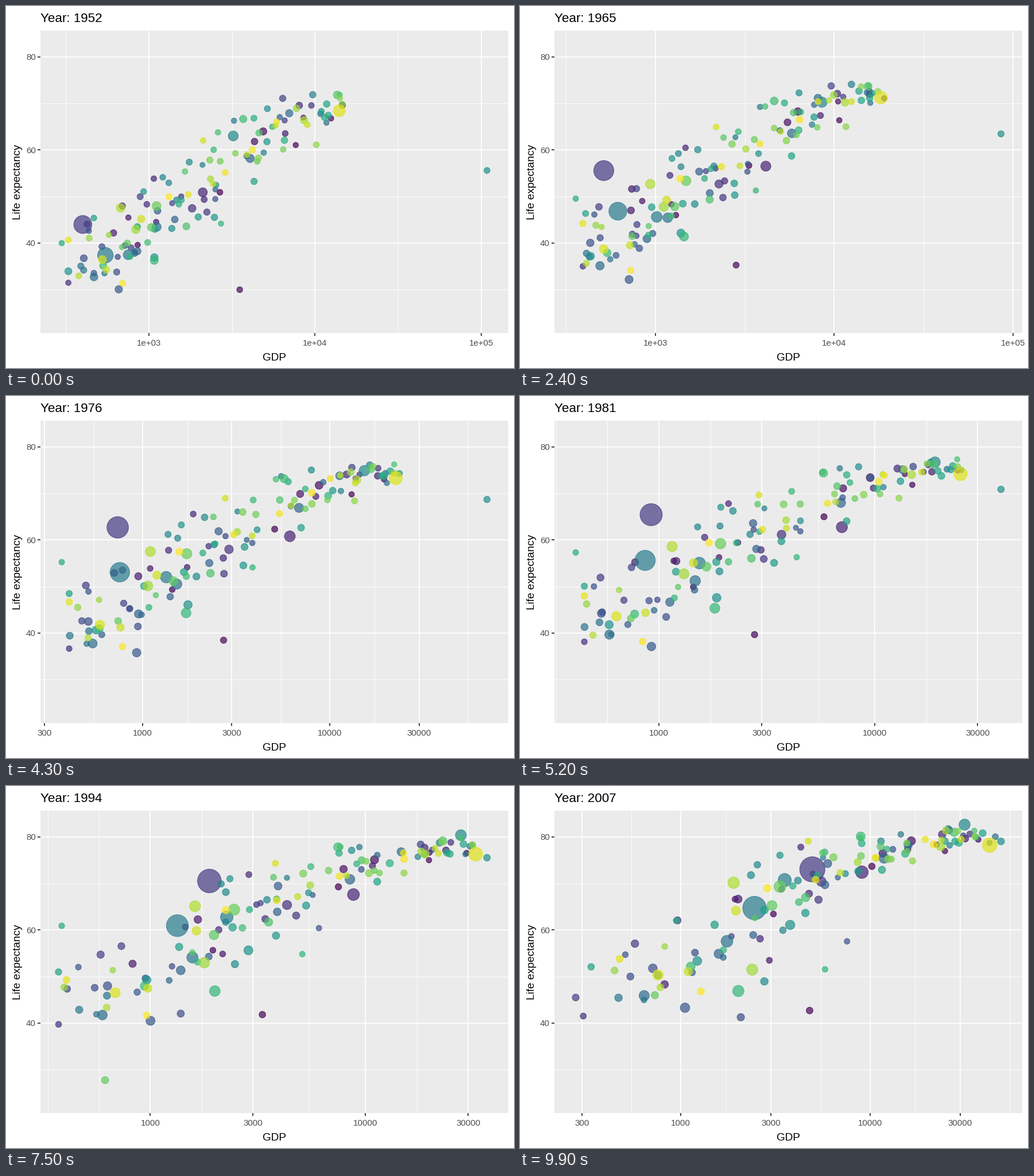
A matplotlib script for the animation above (10 s loop, 885 by 632 pixels).

```python
import numpy as np
import matplotlib.pyplot as plt
from matplotlib.animation import FuncAnimation

W, H, DPI = 885, 632, 120
FRAMES, INTERVAL = 100, 100
LEFT, RIGHT, TOP, BOTTOM = 60, 875, 43.4, 571.4
N = 142
YEARS = np.arange(1952, 2008, 5)
F = np.linspace(0, 1, len(YEARS))

# Colour rank, population range (millions), then GDP and life expectancy
# in 1952, 1980 and 2007.
LARGE = [
    (24, (556, 1319), (400, 880, 4959), (44, 65, 73)),
    (58, (372, 1110), (547, 840, 2452), (37.4, 55.2, 64.7)),
    (134, (158, 301), (13990, 24500, 42952), (68.4, 74, 78.2)),
    (66, (86, 127), (3217, 18400, 31656), (63, 76.4, 82.6)),
    (59, (82, 223), (750, 1500, 3541), (37.5, 54.5, 70.7)),
    (14, (57, 190), (2109, 6900, 9066), (50.9, 62.4, 72.4)),
    (94, (33, 135), (1077, 1800, 2014), (36.3, 45.2, 46.9)),
    (3, (4, 12), (3520, 2750, 4797), (30, 39.5, 42.7)),
]
# Bubbles at the ends of the x axis: log GDP turns at these years.
RICHEST, POOREST, FALLING, CRASHING = 71, 87, 27, 107
TURNS = {
    RICHEST: ([1952, 1957, 1967, 1972, 1982, 1987, 2007],
              [5.035, 5.055, 4.908, 5.039, 4.528, 4.5, 4.693]),
    POOREST: ([1952, 1962, 1977, 1982, 1992, 2007],
              [2.475, 2.55, 2.57, 2.627, 2.54, 2.975]),
    FALLING: ([1952, 1977, 1992, 2002, 2007],
              [2.893, 2.9, 2.66, 2.382, 2.444]),
}


def curve(keys):
    """Parabola through the 1952, 1980 and 2007 values."""
    return np.polyval(np.polyfit([0, 28, 55], keys, 2), YEARS - 1952)


def wealth(u):
    """Log GDP for wealth rank u, widening over the years."""
    return 2.6 + .08 * F + (1.55 + .4 * F) * u ** (1.2 - .28 * F)


def health(g):
    """Life expectancy rises with log GDP along an S curve."""
    return 32 + 6 * F + (42 + 2 * F) / (1 + np.exp((.4 * F - 2.6) * (g - 3.35 + .15 * F)))


def build():
    rng = np.random.default_rng(12)
    u = rng.permutation(np.linspace(0, 1, N))[:, None]
    u[CRASHING] = .08

    # Every bubble follows the trend with its own offsets.
    start, end = rng.normal(0, .1, (2, N, 1))
    gdp = wealth(u) + (1 - F) * start + F * end * (1.3 - u)
    gdp += rng.normal(0, .035, gdp.shape)

    first = np.clip(rng.lognormal(np.log(4.5), 1.1, (N, 1)), .06, 60)
    pop = first * (1 + F * (2.2 - 1.9 * u ** 2))

    for i, (years, keys) in TURNS.items():
        gdp[i] = np.interp(YEARS, years, keys)
    for i, people, g, _ in LARGE:
        gdp[i] = curve(np.log10(g))
        pop[i] = np.interp(F, [0, 1], people)
    gdp[CRASHING] = 2.87 - .12 * np.exp(-((YEARS - 1997) / 6) ** 2)

    ends = gdp[list(TURNS)]
    inner = np.setdiff1d(np.arange(N), list(TURNS))
    gdp[inner] = np.clip(gdp[inner], ends.min(0) + .04, ends.max(0) - .03)

    z = np.clip(rng.normal(0, 1, (N, 1)), -2.2, 1.5)
    spread = np.interp(gdp, [2.5, 3.3, 3.8, 4.2], [4, 6.5, 4.5, 1.4])
    life = health(gdp) + z * spread + rng.normal(0, .4, gdp.shape)
    life -= 13 * (rng.random((N, 1)) < .1) * (u < .75) * np.clip((YEARS - 1987) / 15, 0, 1)

    life[RICHEST] = curve((55.6, 70.5, 79))
    life[POOREST] = curve((40, 57, 62))
    life[FALLING] = curve((39, 47, 45.5))
    for i, _, _, keys in LARGE:
        life[i] = curve(keys)
    life[CRASHING] = 40 + 6 * F
    life[CRASHING, YEARS == 1992] = 23.6
    life[CRASHING, YEARS == 1997] = 36.1

    size = 2 + 10 * np.sqrt(np.clip(pop / 1319, 0, 1))
    return gdp, life, size, ends


GDP, LIFE, SIZE, ENDS = build()

plt.rcParams["font.family"] = "Liberation Sans"
fig = plt.figure(figsize=(W / DPI, H / DPI), dpi=DPI, facecolor="white")
ax = fig.add_axes([LEFT / W, 1 - BOTTOM / H, (RIGHT - LEFT) / W, (BOTTOM - TOP) / H],
                  facecolor="#EBEBEB")
ax.set_axisbelow(True)
for spine in ax.spines.values():
    spine.set_visible(False)
ax.tick_params(which="major", length=2.75, width=1.07, color="#333333",
               labelcolor="#4D4D4D", labelsize=9)
ax.tick_params(which="minor", length=0)
ax.tick_params(axis="x", pad=3.6)
ax.tick_params(axis="y", pad=2.2)
ax.grid(which="major", color="white", linewidth=1.07)
ax.grid(which="minor", color="white", linewidth=.53)
ax.set_yticks([40, 60, 80])
ax.set_yticks([30, 50, 70], minor=True)
ax.set_ylim(20.649, 85.553)


def label(x, y, text, size, **kw):
    return fig.text(x / W, 1 - y / H, text, fontsize=size, color="black",
                    va="baseline", **kw)


title = label(60, 28, "", 13.4)
label((LEFT + RIGHT) / 2, 619, "GDP", 11.4, ha="center")
label(25, (TOP + BOTTOM) / 2, "Life expectancy", 11.4, ha="center",
      rotation=90, rotation_mode="anchor")

colors = plt.get_cmap("viridis")(np.linspace(0, 1, N))
colors[:, 3] = .7
dots = ax.scatter(GDP[:, 0], LIFE[:, 0], c=colors, edgecolors=colors,
                  linewidths=.71, zorder=3)


def set_axis(low, high):
    pad = .05 * (high - low)
    low, high = low - pad, high + pad
    decades = high >= 5
    if decades:
        breaks = np.arange(2, 7.)
    else:
        breaks = np.log10([300, 1000, 3000, 10000, 30000])
    major = breaks[(breaks >= low) & (breaks <= high)]
    step = major[1] - major[0]
    full = np.r_[major[0] - step, major, major[-1] + step]
    minor = np.r_[full[0], (full[1:] + full[:-1]) / 2, full[-1]]
    minor = minor[(minor > low) & (minor < high)]
    names = [f"1e+{m:02.0f}" if decades else f"{10 ** m:.0f}" for m in major]
    ax.set_xticks(major, names)
    ax.set_xticks(minor, minor=True)
    ax.set_xlim(low, high)


def update(frame):
    t = 55 * frame / (FRAMES - 1)
    k = min(int(t / 5), len(YEARS) - 2)
    w = t / 5 - k

    def at(a):
        return (1 - w) * a[:, k] + w * a[:, k + 1]

    ends = at(ENDS)
    set_axis(ends.min(), ends.max())
    dots.set_offsets(np.c_[at(GDP), at(LIFE)])
    dots.set_sizes((.75 * (at(SIZE) * 2.845 + .945)) ** 2)
    title.set_text(f"Year: {1952 + t:.0f}")
    return dots, title


anim = FuncAnimation(fig, update, frames=FRAMES, interval=INTERVAL,
                     repeat=True, repeat_delay=0, blit=False)
plt.show()
```
